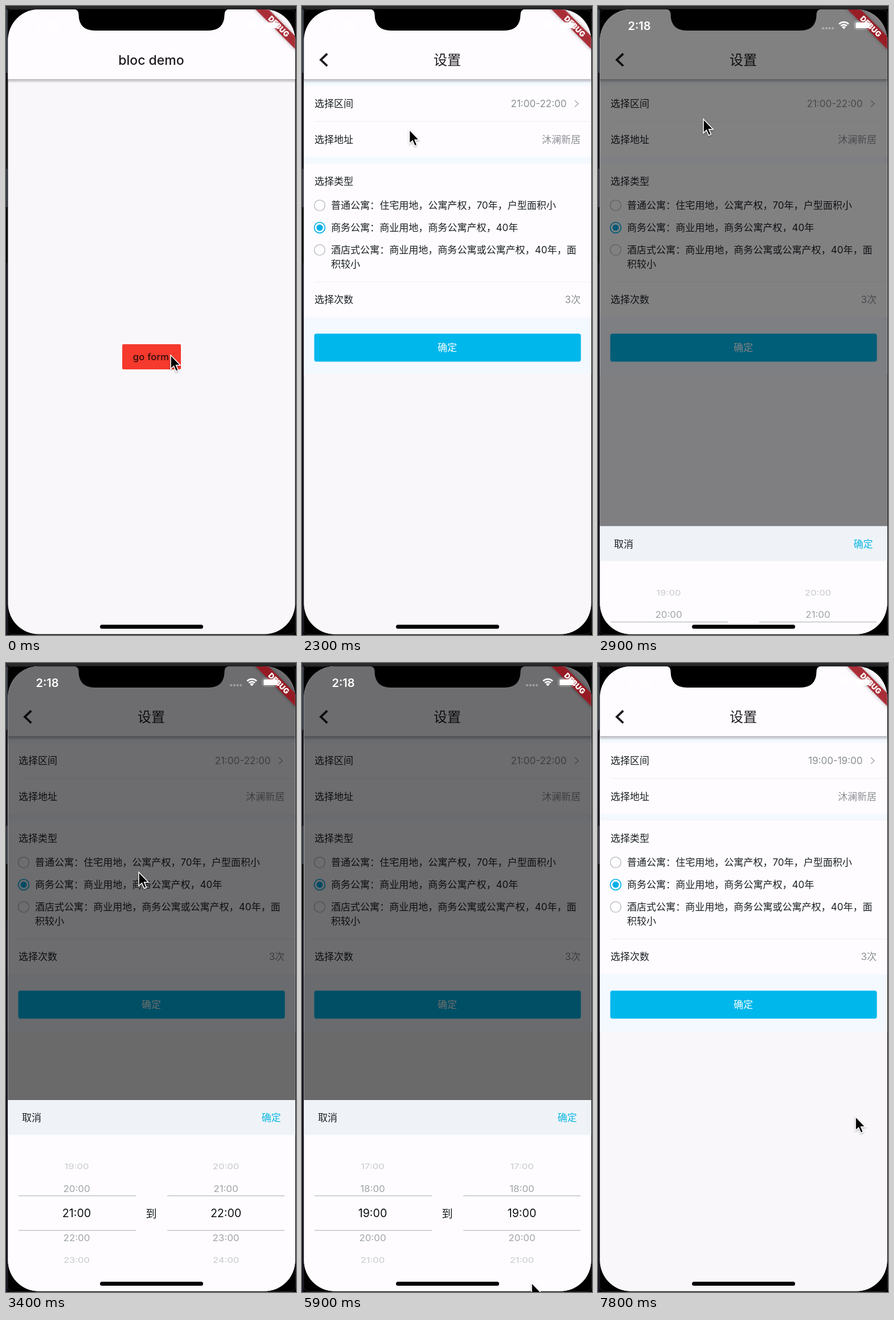
These frames come from a looping animation (509x1101 px, 8000 ms). An HTML page:

```html
<!DOCTYPE html>
<html lang="zh-CN">
<head>
<meta charset="utf-8">
<title>bloc demo</title>
<style>
html, body { margin: 0; width: 100%; height: 100%; overflow: hidden; background: #000; }
svg { display: block; width: 509px; height: 1101px; }
text { font-family: Inter, "Noto Sans CJK SC", "Noto Sans CJK", sans-serif; white-space: pre; }
</style>
</head>
<body>
<svg id="stage" viewBox="0 0 509 1101" xmlns="http://www.w3.org/2000/svg"></svg>
<script>
const INK = '#1b2023', GREY = '#8b8f93', CYAN = '#00b7ec', PALE = '#f4f8ff', CARD = '#fefcff', PAGE = '#f9f7fa';
const LOOP = 8000, STEP = 100;

const rect = (x, y, w, h, fill, more = '') =>
  `<rect x="${x}" y="${y}" width="${w}" height="${h}" fill="${fill}" ${more}/>`;
// y is the optical middle of the line
const text = (x, y, size, str, fill = INK, anchor = 'start', more = '') =>
  `<text x="${x}" y="${y + size * 0.37}" font-size="${size}" fill="${fill}" text-anchor="${anchor}" ${more}>${str}</text>`;
const path = (d, stroke, width, more = '') =>
  `<path d="${d}" fill="none" stroke="${stroke}" stroke-width="${width}" ${more}/>`;

const appBar = title => rect(3, 128, 506, 7, 'url(#shade)') + rect(3, 5, 506, 123, CARD) +
  text(255, 94, ...title, '#1d1b1e', 'middle', 'font-weight="500"');

const radio = (y, on) =>
  `<circle cx="31" cy="${y}" r="9.4" fill="none" stroke="${on ? '#10b4e6' : '#b9bbbe'}" stroke-width="${on ? 1.8 : 1.4}"/>` +
  (on ? `<circle cx="31" cy="${y}" r="5.6" fill="#00b0e8"/>` : '');

const line = (x, y, w, fill) => rect(x, y, w, 1.2, fill);

const home = appBar([23, 'bloc demo']) +
  rect(204, 592, 103, 44, '#f5392d', 'rx="2.5"') +
  text(254.5, 614, 16.6, 'go form', '#2b0d0c', 'middle', 'font-weight="500" letter-spacing=".2"');

const form = rect(3, 128, 506, 972, PAGE) + rect(3, 128, 506, 517, PALE) +
  rect(3, 140, 506, 124, CARD) + rect(3, 276, 506, 268.5, CARD) +
  line(22, 201.5, 487, '#eff1f5') + line(22, 482.5, 487, '#eff1f5') +
  text(22, 171, 17, '选择区间') + text(464.5, 171, 17, '', GREY, 'end', 'id="range"') +
  path('M479 165.5L485 171L479 176.5', '#a9acb0', 1.6) +
  text(22, 233.5, 17, '选择地址') + text(489, 233.5, 17, '沐澜新居', GREY, 'end') +
  text(22, 306.5, 17, '选择类型') +
  radio(349) + text(51, 349, 17.05, '普通公寓：住宅用地，公寓产权，70年，户型面积小') +
  radio(388, true) + text(51, 388, 17.05, '商务公寓：商业用地，商务公寓产权，40年') +
  radio(427) + text(51, 427, 17.05, '酒店式公寓：商业用地，商务公寓或公寓产权，40年，面') +
  text(51, 452, 17.05, '积较小') +
  text(22, 514, 17, '选择次数') + text(489, 514, 17, '3次', GREY, 'end') +
  rect(21.5, 573.5, 468, 49, CYAN, 'rx="4"') +
  text(255, 598, 17, '确定', '#fff', 'middle', 'font-weight="500"');

const loading = rect(3, 128, 506, 972, PALE) + path('', '#d9302a', 5, 'id="spinner" stroke-linecap="square"');

const settings = rect(3, 5, 506, 1095, PAGE) +
  `<g id="loading">${loading}</g><g id="form">${form}</g>` +
  appBar([24, '设置']) + path('M44.3 83.5L33 94.2L44.3 105', '#1d1b1e', 3.8);

const sheet = rect(3, 765, 506, 340, CARD) + rect(3, 765, 506, 61, '#eff3f8') +
  text(28, 796, 17, '取消') + text(482.5, 796, 17, '确定', '#0bb6e2', 'end') +
  [22, 283].map(x => line(x, 932, 206, '#b6b9bb') + line(x, 992.6, 206, '#b6b9bb')).join('') +
  text(255, 963.5, 19.4, '到', INK, 'middle') + '<g id="wheels"></g>';

const banner = `<g transform="translate(479 35.5) rotate(45)">
  <rect x="-80" y="-8" width="160" height="16" fill="#a01416" fill-opacity=".8" filter="url(#soft)"/>
  ${text(0, 0, 13.2, 'DEBUG', '#fff', 'middle', 'font-weight="900"')}</g>`;

const arc = r => `M${431.5 - r * 0.71} ${40 - r * 0.71}A${r} ${r} 0 0 1 ${431.5 + r * 0.71} ${40 - r * 0.71}`;
const status = text(72.5, 34.5, 20, '2:18', '#fff', 'middle', 'font-weight="600"') +
  [395, 400.7, 406.3, 412].map(x => `<circle cx="${x}" cy="39" r="2.1" fill="#fff" opacity=".35"/>`).join('') +
  path(arc(11.8), '#fff', 2.7) + path(arc(7.4), '#fff', 2.7) +
  '<path d="M431.5 40.5L428 36.7A5 5 0 0 1 435 36.7Z" fill="#fff"/>' +
  rect(450, 26.5, 29, 14.5, 'none', 'rx="4.5" stroke="#fff" stroke-opacity=".45" stroke-width="1.2"') +
  rect(452, 28.5, 25, 10.5, '#fff', 'rx="2.6"') + rect(480.5, 31.5, 1.8, 5, '#fff', 'rx=".9" opacity=".5"');

document.getElementById('stage').innerHTML = `
<defs>
  <clipPath id="screen"><rect x="3.5" y="6" width="504" height="1093.5" rx="54"/></clipPath>
  <linearGradient id="shade" x1="0" x2="0" y1="0" y2="1">
    <stop stop-color="#000" stop-opacity=".27"/><stop offset="1" stop-color="#000" stop-opacity="0"/>
  </linearGradient>
  <linearGradient id="edge"><stop stop-color="#000" stop-opacity="0"/><stop offset="1" stop-color="#000" stop-opacity=".1"/></linearGradient>
  <filter id="soft" x="-10%" y="-100%" width="120%" height="300%"><feDropShadow dx="0" dy="0" stdDeviation="3" flood-opacity=".45"/></filter>
  <filter id="drop" x="-50%" y="-50%" width="200%" height="200%"><feDropShadow dx="0" dy="1.5" stdDeviation="1.5" flood-opacity=".35"/></filter>
</defs>
${rect(0, 0, 509, 1101, '#000')}${rect(0, 0, 509, 5.5, '#29292b')}
${rect(0, 6, 3, 111, '#3f434f')}${rect(0, 117, 3, 168, '#131418')}${rect(0, 285, 3, 67, '#393c46')}${rect(0, 450, 3, 651, '#131620')}
${rect(3, 6, 505, 1094, '#000', 'rx="8" stroke="#2a2a2d"')}
<g clip-path="url(#screen)">
  <g id="home">${rect(3, 5, 506, 1095, PAGE)}${home}</g>
  <g id="settings">${rect(-24, 5, 27, 1095, 'url(#edge)')}${settings}</g>
  ${rect(3, 5, 506, 1095, '#000', 'id="barrier"')}
  <g id="sheet">${sheet}</g>
  ${banner}${status}
</g>
<path d="M119 5.5Q127.5 6 127.5 15Q128 43 156 43H355Q383 43 383.500 15Q383.500 6 392 5.500Z" fill="#000"/>
${rect(165, 1083, 181, 7, '#000', 'rx="3.500"')}
<g id="cursor">
  <circle id="ring" cy="2" r="33.500" fill="none" stroke="#0b0b0d" stroke-width="2.200"/>
  <path d="M0 0V24.300L5.400 19.300L9.300 28.400L13.400 26.700L9.500 17.700H17Z" fill="#000" stroke="#fff" stroke-width="1.500" filter="url(#drop)"/>
</g>`;

const el = Object.fromEntries([...document.querySelectorAll('[id]')].map(e => [e.id, e]));
el.wheels.innerHTML = text(0, 0, 17, '', INK, 'middle').repeat(14);
const labels = [...el.wheels.children];

const clamp = v => Math.min(1, Math.max(0, v));

// rows of [time, ...values], read linearly
function track(rows, t) {
  const i = rows.findIndex(r => r[0] > t);
  if (i < 0) return rows.at(-1).slice(1);
  if (i === 0) return rows[0].slice(1);
  const a = rows[i - 1], b = rows[i], p = (t - a[0]) / (b[0] - a[0]);
  return a.slice(1).map((v, k) => v + (b[k + 1] - v) * p);
}

function bezier(x1, y1, x2, y2) {
  const at = (a, b, u) => 3 * (1 - u) * (1 - u) * u * a + 3 * (1 - u) * u * u * b + u * u * u;
  return x => {
    if (x <= 0 || x >= 1) return clamp(x);
    let lo = 0, hi = 1;
    for (let i = 0; i < 24; i++) {
      const mid = (lo + hi) / 2;
      if (at(x1, x2, mid) < x) lo = mid; else hi = mid;
    }
    return at(y1, y2, lo);
  };
}
const ease = bezier(0.25, 0.1, 0.25, 1);
const slideIn = bezier(0.35, 0.91, 0.33, 0.97);
const fastOut = bezier(0.4, 0, 0.2, 1);

const POINTER = [
  [0, 289, 611], [1000, 289, 611], [1300, 277, 612], [1700, 250, 520], [2200, 192, 235], [2400, 185, 198],
  [3000, 185, 198], [3200, 196, 235], [3400, 233, 366], [3700, 150, 900], [3800, 140, 930], [4200, 140, 1027],
  [4300, 160, 1015], [4600, 392, 960], [4700, 398, 962], [5000, 403, 1085], [5900, 403, 1085],
  [6300, 440, 925], [6700, 452, 794]
];
const PRESSES = [[700, 900], [2600, 2700], [3800, 4200], [4700, 5000], [6900, 7000]];
const LEFT = [[3800, 21], [3900, 20.9], [4200, 19.25], [4300, 19.08], [4500, 19]];
const RIGHT = [[4700, 22], [4800, 21.4], [5000, 19.4], [5200, 19.1], [5400, 19]];
const PUSH = 890, SPIN = 927, LOADED = 1600, OPEN = 2759, CLOSE = 7030;

const move = (e, x, y) => e.setAttribute('transform', `translate(${x} ${y})`);
const show = (e, on) => e.setAttribute('display', on ? 'inline' : 'none');

function drawSpinner(t) {
  const turns = Math.max(0, t - SPIN) / 1333.2, n = Math.floor(turns), r = turns - n;
  const head = fastOut(r * 2), tail = fastOut(r * 2 - 1);
  const a = (-90 + tail * 270 + r * 306 - n * 144) * Math.PI / 180;
  const sweep = Math.max(0.001, (head - tail) * 1.5 * Math.PI);
  const pt = q => `${255 + 21.6 * Math.cos(q)} ${614 + 21.6 * Math.sin(q)}`;
  el.spinner.setAttribute('d', `M${pt(a)}A21.6 21.6 0 ${sweep > Math.PI ? 1 : 0} 1 ${pt(a + sweep)}`);
}

function drawWheel(items, x, pos) {
  const mid = Math.round(pos);
  items.forEach((item, i) => {
    const hour = mid + i - 3, angle = (hour - pos) * 19.5 * Math.PI / 180, dy = 130 * Math.sin(angle);
    const cos = Math.cos(angle), chosen = hour === mid, size = chosen ? 19.6 : 17;
    show(item, hour <= 24);
    item.textContent = hour + ':00';
    item.setAttribute('font-size', size);
    item.setAttribute('y', size * 0.37);
    item.setAttribute('fill', chosen ? '#0e1214' : '#9fa4a8');
    item.setAttribute('opacity', clamp((108 - Math.abs(dy)) / 45));
    item.setAttribute('transform', `translate(${x} ${963 + dy}) scale(${0.9 + 0.1 * cos} ${cos})`);
  });
}

function render(t) {
  const push = slideIn((t - PUSH) / 400);
  move(el.home, -168 * push, 0);
  move(el.settings, 504 * (1 - push), 0);
  show(el.home, push < 1);
  show(el.settings, push > 0);
  show(el.loading, t < LOADED);
  show(el.form, t >= LOADED);
  drawSpinner(t);
  el.range.textContent = t < CLOSE ? '21:00-22:00' : '19:00-19:00';

  const up = t < CLOSE ? clamp((t - OPEN) / 250) : 1 - clamp((t - CLOSE) / 200);
  el.barrier.setAttribute('opacity', 0.57 * ease(up));
  show(el.sheet, up > 0);
  move(el.sheet, 0, 334 * (1 - up));
  drawWheel(labels.slice(0, 7), 124, track(LEFT, t)[0]);
  drawWheel(labels.slice(7), 386, track(RIGHT, t)[0]);

  move(el.cursor, ...track(POINTER, t));
  show(el.ring, PRESSES.some(([a, b]) => t >= a && t <= b));
}

const start = performance.now();
function tick() {
  const t = (performance.now() - start) % LOOP;
  render(Math.floor(t / STEP) * STEP);
  requestAnimationFrame(tick);
}
tick();
</script>
</body>
</html>
```
